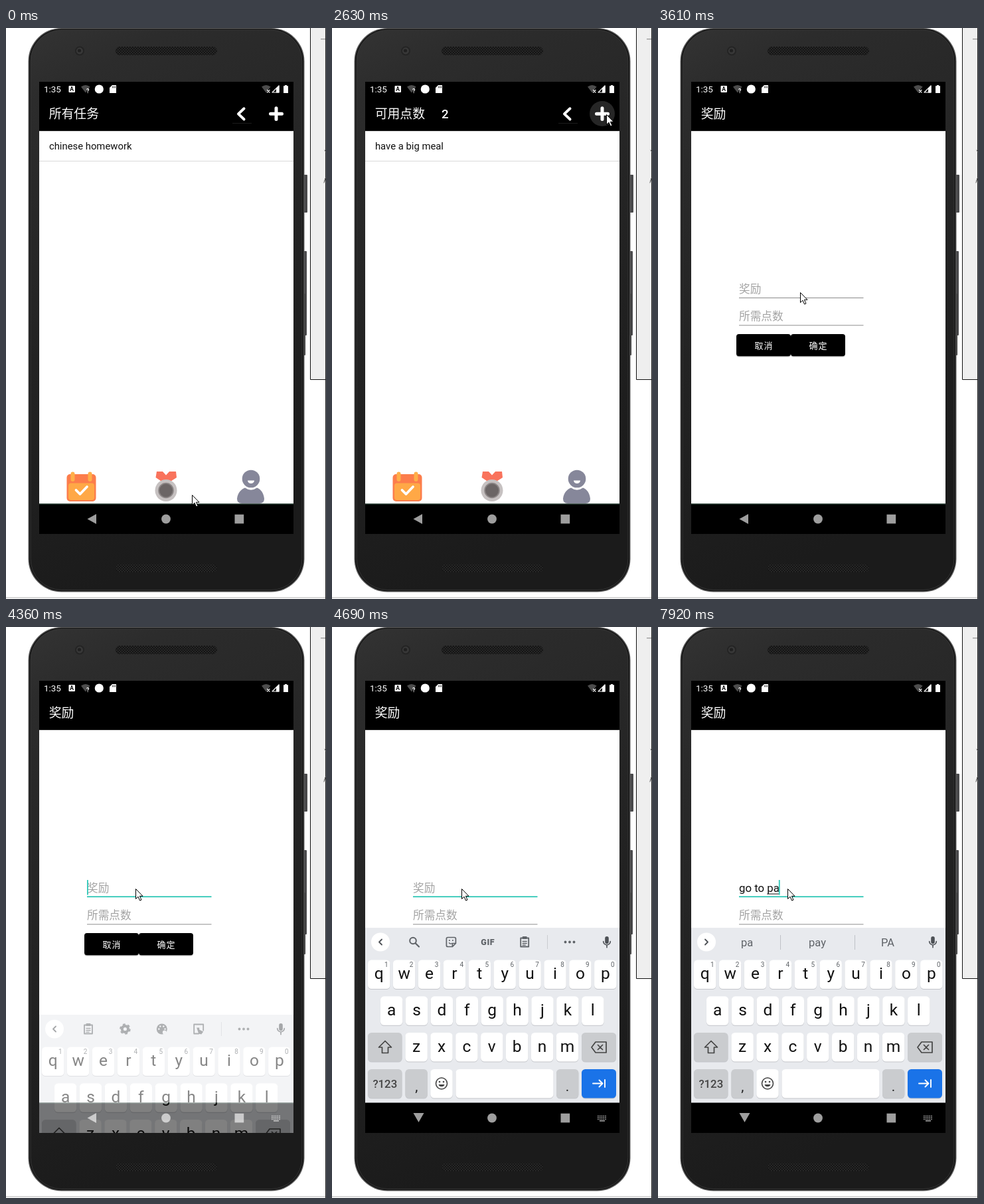
Animation, 482 px wide and 860 px high, one loop 8000 ms. Source, as an HTML page:

```html
<!DOCTYPE html>
<html lang="zh-CN">
<head>
<meta charset="utf-8">
<title>任务</title>
<style>
html, body { margin: 0; width: 100%; height: 100%; overflow: hidden; background: #fff; }
svg { display: block; width: 482px; height: 860px; }
text { font-family: Roboto, "Noto Sans CJK SC", "Noto Sans CJK", sans-serif; white-space: pre; }
.line { fill: none; stroke-linecap: round; stroke-linejoin: round; }
</style>
</head>
<body>
<svg id="stage" viewBox="0 0 482 860" xmlns="http://www.w3.org/2000/svg"></svg>
<script>
const LOOP = 8000, TICK = 46.875;
const CENTER = [241.5, 421.5];
const FIELD_X = 122, FIELD_SIZE = 16.8;
const TITLE_X = 64.7, TITLE_SIZE = 18.85;

const rect = (x, y, w, h, fill, rx = 0, more = '') =>
  `<rect x="${x}" y="${y}" width="${w}" height="${h}" rx="${rx}" fill="${fill}" ${more}/>`;
const circle = (x, y, r, fill, more = '') =>
  `<circle cx="${x}" cy="${y}" r="${r}" fill="${fill}" ${more}/>`;
const shape = (d, fill, more = '') => `<path d="${d}" fill="${fill}" ${more}/>`;
const line = (d, color, width, more = '') =>
  `<path class="line" d="${d}" stroke="${color}" stroke-width="${width}" ${more}/>`;
const text = (x, y, size, fill, s, more = '') =>
  `<text x="${x}" y="${y}" font-size="${size}" fill="${fill}" ${more}>${s}</text>`;
const mid = 'text-anchor="middle"';
const group = (id, body, more = '') => `<g id="${id}" ${more}>${body}</g>`;
const at = (x, y, body) => `<g transform="translate(${x} ${y})">${body}</g>`;

function phone() {
  const speaker = y => rect(165, y, 153, 13, '#151515', 6.5) + rect(165, y, 153, 13, 'url(#mesh)', 6.5);
  return rect(0, 857, 482, 2, '#d8d8d8')
    + rect(458, -1, 24, 530.5, '#efefef') + line('M458.5 0V529.5H482', '#111', 1)
    + rect(481, 0, 1, 860, '#222')
    + rect(474, 16, 7, 1.3, '#999')
    + line('M480 184l2 3M479 233l2-7h1M480 230h2', '#555', 1)
    + rect(448, 221, 6, 57, '#4a4a4c', 1) + rect(447, 336, 6, 127, '#4a4a4c', 1)
    + rect(447, 400, 4, 93, '#3a3a3a', 1)
    + rect(33.5, 0, 416, 849.5, '#5c5c5c', 50)
    + rect(34.8, 1.3, 413.4, 846.9, '#141414', 49)
    + rect(37, 3, 409, 843.5, 'url(#body)', 47, 'stroke="#3b3b3b" stroke-width=".8"')
    + circle(111, 34.5, 7, '#242424') + circle(111, 34.5, 5, '#383838') + circle(110.5, 34, 2.6, '#202020')
    + speaker(28) + speaker(807)
    + rect(50, 81, 383, 681, '#000');
}

function statusBar() {
  const wifi = x => shape(`M${x} 88.5Q${x + 6.8} 83.5 ${x + 13.6} 88.5L${x + 6.8} 97.5Z`, '#4c4c4c');
  return text(57, 97, 13.4, '#fff', '1:35')
    + rect(94.5, 87, 9.5, 10, '#fff', 1) + text(99.2, 95.2, 8.5, '#000', 'A', mid + ' font-weight="700"')
    + wifi(113) + text(121, 98, 9, '#fff', '?', 'font-weight="700"')
    + circle(140.3, 92, 6.6, '#fff')
    + shape('M160 86H166V98H156V90Z', '#fff') + line('M160.5 88v2M162.5 88v2M164.5 88v2', '#000', .8)
    + wifi(385) + line('M393.5 93.5l3.5 3.5M397 93.5l-3.5 3.5', '#fff', 1.2)
    + line('M411 87V97H401Z', '#fff', 1.2) + shape('M407 91L411.5 86.5V97.5H407Z', '#fff')
    + shape('M420 86h3v1.3h2V98h-7V87.3h2Z', '#fff');
}

const windowBase = rect(50, 81, 383, 681, '#000') + rect(50, 155, 383, 561.5, '#fff')
  + rect(50, 155, 383, 1, '#d4d4d4') + rect(50, 716.5, 383, 1, '#2a4a3c');

function tabIcons() {
  const calendar = rect(91.5, 672, 44, 41, '#fc7d4b', 5) + rect(94, 685.5, 39, 25.5, '#ffa846', 4)
    + rect(97.5, 668.5, 6, 14.5, '#ffaf48', 3) + rect(123.5, 668.5, 6, 14.5, '#ffaf48', 3)
    + line('M105.5 696l6 6 10.5-11', '#fff', 3.8);
  const medal = shape('M227 668H236L241 673.5 246 668H256L257 677 246 684H236L225.5 677Z', '#f9735c')
    + circle(241, 696.5, 16.5, '#c6c1c1') + circle(241, 696.5, 11.8, '#8c8686') + circle(241, 696.5, 10, '#6b6565');
  const person = circle(369, 679, 13.3, '#86879a') + shape('M364 681.5h10a5 4.6 0 0 1-10 0Z', '#fff')
    + shape('M348 709C349 700 354 695 360 692.5Q369 699 378 692.5C384 695 388 700 389 709Q389 716 382 716H355Q348 716 348 709Z', '#86879a');
  return calendar + medal + person;
}

function home() {
  const title = s => text(TITLE_X, 136, TITLE_SIZE, '#fff', s);
  const item = s => text(64.9, 183, 14.85, '#111', s);
  return windowBase
    + group('tasks', title('所有任务') + item('chinese homework'))
    + group('rewards', title('可用点数') + text(165, 136, 18.7, '#fff', '2', 'font-weight="500"') + item('have a big meal'))
    + circle(407, 129, 19, '#fff', 'id="ripple"')
    + rect(341, 143, 29, 1, '#1c1c1c')
    + line('M358.5 121.3L350 129.4l8.5 8.1', '#fff', 4)
    + line('M398.5 129.2h17M407 120.8v16.8', '#fff', 5)
    + rect(50, 200, 383, 1, '#d9d9d9') + tabIcons()
    + rect(50, 81, 383, 681, '#000', 0, 'id="dim"');
}

function form() {
  const button = (x, label) => rect(x, 462, 82, 33.5, '#bbb', 4) + rect(x, 461, 82, 33.3, '#000', 4)
    + text(x + 41.5, 482.6, 13.05, '#fff', label, mid + ' letter-spacing="1" font-weight="500"');
  return windowBase + text(TITLE_X, 136, TITLE_SIZE, '#fff', '奖励')
    + text(FIELD_X, 399, 16.7, '#a3a3a3', '奖励', 'id="hint"')
    + text(FIELD_X, 399, FIELD_SIZE, '#111', '', 'id="typed"')
    + rect(FIELD_X, 401.5, 0, 1.1, '#222', 0, 'id="composing"')
    + rect(FIELD_X, 406, 187.5, 1, '#8a8a8a', 0, 'id="rule"')
    + rect(FIELD_X, 381, 1.8, 22.5, '#2ec8b8', 0, 'id="caret"')
    + text(FIELD_X, 440, 16.7, '#a3a3a3', '所需点数') + rect(FIELD_X, 447.3, 187.5, 1, '#8f8f8f')
    + button(118, '取消') + button(200, '确定');
}

const GREY = '#5f6368';
const icons = {
  clipboard: line('M-6-6H6V7H-6Z', GREY, 1.8) + rect(-3.5, -8.5, 7, 4, GREY, 1) + line('M-3-1H3M-3 2H3M-3 4.7H1', GREY, 1.3),
  search: circle(-2, -2, 4.8, 'none', `stroke="${GREY}" stroke-width="2"`) + line('M2 2l5 5', GREY, 2.2),
  sticker: line('M-5-7H5Q7-7 7-5V2L2 7H-5Q-7 7-7 5V-5Q-7-7-5-7ZM2 7V2H7', GREY, 1.7)
    + circle(-2.5, -2.5, 1.1, GREY) + circle(2.5, -2.5, 1.1, GREY) + line('M-3 1.2Q-1 3.5 1 2', GREY, 1.3),
  gear: circle(0, 0, 4.6, 'none', `stroke="${GREY}" stroke-width="4"`)
    + circle(0, 0, 7, 'none', `stroke="${GREY}" stroke-width="2.6" stroke-dasharray="3.7 3.63"`),
  palette: circle(0, 0, 8, GREY) + circle(4, 5, 3, '#e8eaee')
    + [[-4.5, 0], [-2.5, -4], [2.5, -4], [4.8, 0]].map(p => circle(...p, 1.3, '#e8eaee')).join(''),
  oneHand: line('M7 2V-7H-7V7H0', GREY, 1.8) + shape('M-3-2L1-2 1 1 7 4 4 8 0 7Z', GREY),
  mic: rect(-2.8, -8.5, 5.6, 11, '#4d5156', 2.8) + line('M-5.3-1a5.3 5.3 0 0 0 10.6 0M0 5v3.3', '#4d5156', 1.6)
};

function keyboard() {
  const key = (x, y, w, fill = '#fff') => rect(x, y + 1, w, 43.5, '#c3c5ca', 5.5) + rect(x, y, w, 43.5, fill, 5.5);
  const DARK = '#cacccf', PITCH = 37.9, KEY = 33.4;
  const row = (letters, x0, y) => [...letters].map((c, i) => {
    const x = x0 + i * PITCH;
    return key(x, y, KEY) + text(x + KEY / 2, y + 28.5, 24.5, '#111', c, mid)
      + (y < 510 ? text(x + 27.7, y + 10.5, 10, GREY, (i + 1) % 10, mid) : '');
  }).join('');
  const tray = (id, names) => group(id, names.map((n, i) => at(124 + i * 55.4, 474.5, icons[n] ||
      text(0, 4.3, 12.5, GREY, n, mid + ' font-weight="900" letter-spacing=".6"'))).join('')
    + rect(324, 464, 1, 21, '#c9cbd0') + [351.5, 358, 364.5].map(x => circle(x, 474.5, 1.9, GREY)).join(''));
  return rect(50, 453, 383, 310, '#e8eaee')
    + circle(73, 474.5, 14, '#fff') + line('M75 470.5l-4 4 4 4', '#4d5156', 1.8, 'id="chevron"')
    + tray('firstTray', ['clipboard', 'gear', 'palette', 'oneHand'])
    + tray('tray', ['search', 'sticker', 'GIF', 'clipboard'])
    + group('suggestions', [134, 240, 346].map(x => text(x, 481, 16.5, GREY, '', mid)).join('')
      + rect(184, 464, 1, 22, '#bfc2c7') + rect(296, 464, 1, 22, '#bfc2c7'))
    + at(414, 474.5, icons.mic)
    + row('qwertyuiop', 54, 501.5) + row('asdfghjkl', 72.9, 556.3) + row('zxcvbnm', 110.4, 611)
    + key(54, 611, 51.5, DARK) + line('M80 623.5l9.5 9.5h-5v8.5h-9V633h-5Z', '#444', 1.7)
    + key(376, 611, 52, DARK) + line('M391 633l6-8h16v16h-16ZM400.5 629.5l7 7M407.5 629.5l-7 7', '#444', 1.7)
    + key(54, 666, 51.5, DARK) + text(79.8, 693.5, 16.8, '#444', '?123', mid + ' font-weight="500"')
    + key(110.4, 666, KEY, DARK) + text(127.2, 699, 21, '#222', ',', mid)
    + key(148.3, 666, KEY) + circle(165, 687.5, 8.5, 'none', 'stroke="#444" stroke-width="1.6"')
    + circle(162, 685, 1.3, '#444') + circle(168, 685, 1.3, '#444') + shape('M160.5 689h9a4.6 4 0 0 1-9 0Z', '#444')
    + key(186.5, 666, 147)
    + key(338, 666, KEY, DARK) + text(354.6, 699, 21, '#222', '.', mid)
    + key(376, 666, 52, '#1a73e8') + line('M393 687.5h14M402.5 682.5l5 5-5 5M411 682v11', '#fff', 1.9);
}

function navIcons() {
  const dots = [736.5, 739, 741.5].map(y => `M400 ${y}H414`).join('');
  return `<g fill-opacity=".62" stroke-opacity=".62">`
    + shape('M122.5 739.5L136 732V747Z', '#fff', 'id="back"') + shape('M122.5 732H138.5L130.5 746Z', '#fff', 'id="hide"')
    + circle(241, 739.5, 6.9, '#fff') + rect(344.5, 732.7, 13.7, 13.7, '#fff')
    + group('switcher', `<path d="${dots}" stroke="#fff" stroke-width="1.6" stroke-dasharray="1.7 1.1"/>`
      + rect(403, 743, 8, 1.6, '#fff')) + '</g>';
}

const stage = document.getElementById('stage');
// navFill hides the keyboard panel behind the navigation icons once it is at rest.
stage.innerHTML = `<defs>
  <linearGradient id="body" x1="0" y1="0" x2=".25" y2="1">
    <stop offset="0" stop-color="#333"/><stop offset=".12" stop-color="#2c2c2c"/>
    <stop offset=".5" stop-color="#242424"/><stop offset="1" stop-color="#1b1b1b"/></linearGradient>
  <pattern id="mesh" width="4" height="4" patternUnits="userSpaceOnUse">
    <rect width="1.6" height="1.6" fill="#303030"/><rect x="2" y="2" width="1.6" height="1.6" fill="#303030"/></pattern>
  <clipPath id="screen"><rect x="50" y="81" width="383" height="681"/></clipPath></defs>`
  + phone()
  + `<g clip-path="url(#screen)">${group('home', home()) + group('form', form())}
     ${rect(50, 81, 383, 24, '#000') + statusBar() + group('keyboard', keyboard())
       + rect(50, 716.5, 383, 46, '#000', 0, 'id="navFill"') + navIcons()}</g>`
  + group('pointer', shape('M.5 .5V15.5L4 12.2 6.6 18 9 17 6.4 11.3H11Z', '#fff', 'stroke="#000" stroke-linejoin="round"'));

const el = {};
stage.querySelectorAll('[id]').forEach(node => el[node.id] = node);
const words = el.suggestions.querySelectorAll('text');
const pen = document.createElement('canvas').getContext('2d');

// Tables below are timed in ticks.
const POINTER = [[0, 280, 703], [5, 280, 703], [6, 228, 688], [10, 228, 688], [11, 226, 680], [12, 241, 693],
  [23, 241, 693], [26, 250, 693], [31, 250, 693], [32, 230, 686], [41, 413, 130], [68, 413, 130],
  [77, 214, 398], [79, 214, 398], [81, 195, 394]];
// tick, text, start of the word being composed
const TYPING = [[0, '', 0], [124, 'g', 0], [130, 'go', 0], [140, 'go ', 0], [145, 'go t', 3], [150, 'go to', 3],
  [160, 'go to ', 3], [162, 'go to p', 6], [163, 'go to pa', 6]];
const SUGGEST = [[0, '', '', ''], [125, 'g', 'good', 'getting'], [132, 'go', 'good', 'got'], [147, 't', 'the', 'to'],
  [152, 'to', 'too', 'tonight'], [156, 'to', 'too', 'today'], [164, 'p', 'please', 'people'], [168, 'pa', 'pay', 'PA']];
const CARET = [[0, 0], [85, 1], [100, 0], [109, 1], [119, 0], [124, 1]];

const clamp = v => Math.max(0, Math.min(1, v));
const smooth = v => v * v * (3 - 2 * v);
const latest = (table, n) => table.filter(row => row[0] <= n).pop();
const set = (node, attrs) => { for (const k in attrs) node.setAttribute(k, attrs[k]); };
const show = (node, on) => set(node, { visibility: on ? 'visible' : 'hidden' });
const measure = s => { pen.font = `${FIELD_SIZE}px Roboto, sans-serif`; return pen.measureText(s).width; };
const zoom = k => `translate(${CENTER[0] * (1 - k)} ${CENTER[1] * (1 - k)}) scale(${k})`;

function pointerAt(n) {
  const i = POINTER.findIndex(row => row[0] > n);
  if (i < 0) return POINTER[POINTER.length - 1].slice(1);
  const [a, ax, ay] = POINTER[i - 1], [b, bx, by] = POINTER[i];
  const k = smooth((n - a) / (b - a));
  return [ax + (bx - ax) * k, ay + (by - ay) * k];
}

function draw(n) {
  set(el.pointer, { transform: `translate(${pointerAt(n).map(Math.round)})` });
  show(el.tasks, n < 24);
  show(el.rewards, n >= 24);
  set(el.ripple, { opacity: .2 * Math.min(clamp((n - 53) / 4), clamp((61 - n) / 2)) });

  const open = n < 64 ? 0 : 1 - Math.exp(-Math.pow((n - 63.94) / 1.53, 1.8));
  set(el.home, { transform: zoom(1 + .05 * open) });
  set(el.dim, { opacity: .14 * open });
  set(el.form, { transform: zoom(.85 + .15 * open), opacity: clamp(open * 2) });

  const focused = n >= 85;
  set(el.rule, { fill: focused ? '#22c3b2' : '#8a8a8a', y: focused ? 405.4 : 406, height: focused ? 1.7 : 1 });
  const [, typed, start] = latest(TYPING, n);
  const left = FIELD_X + measure(typed.slice(0, start));
  el.typed.textContent = typed;
  show(el.hint, !typed);
  set(el.composing, { x: left, width: measure(typed.slice(start).trim()) });
  set(el.caret, { x: FIELD_X + measure(typed) - (typed ? .9 : 0), opacity: latest(CARET, n)[1] });

  const rise = smooth(clamp((n - 90) / 6));
  set(el.keyboard, { transform: `translate(0 ${262 * (1 - rise)})`, opacity: rise });
  show(el.navFill, rise === 1);
  show(el.back, n < 96);
  show(el.hide, n >= 96);
  show(el.switcher, n >= 90);

  const suggesting = n >= 125;
  show(el.firstTray, n < 98);
  show(el.tray, n >= 98 && !suggesting);
  show(el.suggestions, suggesting);
  set(el.chevron, { d: suggesting ? 'M71 470.5l4 4-4 4' : 'M75 470.5l-4 4 4 4' });
  latest(SUGGEST, n).slice(1).forEach((word, i) => words[i].textContent = word);
}

const began = performance.now();
function frame() {
  const t = (performance.now() - began) % LOOP;
  draw(Math.floor((t + 4) / TICK));
  requestAnimationFrame(frame);
}
frame();
</script>
</body>
</html>
```
